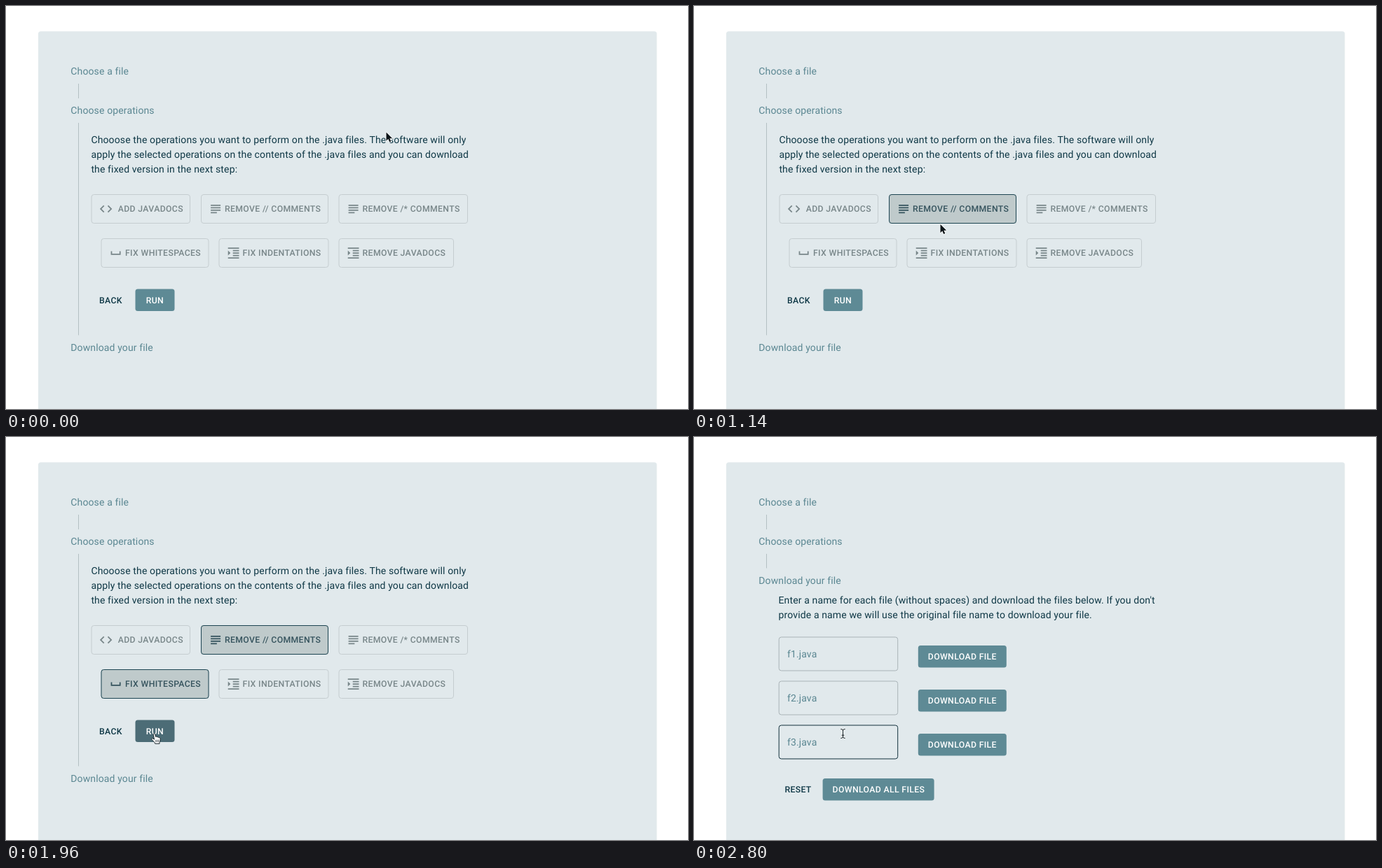
Write an HTML page with a canvas that moves like this. It is 973 px wide and 576 px high and loops after 2.86 s.

```html
<!DOCTYPE html>
<html lang="en">
<head>
<meta charset="utf-8">
<title>Choose operations</title>
<style>
html, body { margin: 0; width: 100%; height: 100%; overflow: hidden; background: #fff; }
canvas { display: block; width: 973px; height: 576px; }
</style>
</head>
<body>
<canvas id="stage"></canvas>
<script>
const W = 973, H = 576, LOOP = 2860;
const canvas = document.getElementById('stage');
const ctx = canvas.getContext('2d');
const dpr = window.devicePixelRatio || 1;
canvas.width = W * dpr;
canvas.height = H * dpr;

const PANEL = '#e1e9ec', INK = '#0f3846', TEAL = '#5b8792', FILL = '#5e8a95', FILL_HOVER = '#4c6c76';
const GRAY = '#788689', EDGE = '#c5cdd0', LINE = '#b3bfc3';
const BODY = '400 14px Roboto, sans-serif', CAPS = '500 12.25px Roboto, sans-serif';

const ICONS = {
  code: 'M9.4 16.6L4.8 12l4.6-4.6L8 6l-6 6 6 6zM14.6 16.6l4.6-4.6-4.6-4.6L16 6l6 6-6 6z',
  lines: 'M14 17H4v2h10zM20 9H4v2h16zM4 15h16v-2H4zM4 5v2h16V5z',
  space: 'M18 9v4H6V9H4v6h16V9z',
  indent: 'M3 21h18v-2H3zM3 8v8l4-4zM11 17h10v-2H11zM3 3v2h18V3zM11 9h10V7H11zM11 13h10v-2H11z'
};
for (const k in ICONS) ICONS[k] = new Path2D(ICONS[k]);

const toggles = [
  { x: 121.5, w: 141.5, y: 269, tx: 159.7, icon: 'code', text: 'ADD JAVADOCS' },
  { x: 278, w: 182, y: 269, tx: 312, icon: 'lines', text: 'REMOVE // COMMENTS', hover: 300, press: 780, select: 960 },
  { x: 474.5, w: 184.5, y: 269, tx: 508.4, icon: 'lines', text: 'REMOVE /* COMMENTS' },
  { x: 135.5, w: 154, y: 332, tx: 170, icon: 'space', text: 'FIX WHITESPACES', hover: 1270, press: 1380, select: 1450 },
  { x: 303.5, w: 157, y: 332, tx: 337.6, icon: 'indent', text: 'FIX INDENTATIONS' },
  { x: 474.5, w: 164.5, y: 332, tx: 508.6, icon: 'indent', text: 'REMOVE JAVADOCS' }
];

// Cursor stops: time, x, y
const track = [
  [0, 543, 181], [20, 543, 181], [400, 398.5, 295.5], [1020, 398.5, 295.5],
  [1360, 238, 354], [1600, 238, 354], [1880, 211.5, 424], [LOOP, 211.5, 424]
];
const SWAP = 2230, SLIDE = 2260, SLIDE_END = 2560;

const ramp = (t, a, b) => Math.min(1, Math.max(0, (t - a) / (b - a)));
const ease = k => k * k * (3 - 2 * k);
const rgb = c => [1, 3, 5].map(i => parseInt(c.slice(i, i + 2), 16));
function mix(a, b, k) {
  const p = rgb(a), q = rgb(b);
  return '#' + p.map((v, i) => Math.round(v + (q[i] - v) * k).toString(16).padStart(2, '0')).join('');
}

function cursorAt(t) {
  let i = 1;
  while (i < track.length - 1 && t > track[i][0]) i++;
  const a = track[i - 1], b = track[i], k = ease(ramp(t, a[0], b[0]));
  return { x: a[1] + (b[1] - a[1]) * k, y: a[2] + (b[2] - a[2]) * k };
}

function label(s, x, y, color, font = BODY) {
  ctx.font = font;
  ctx.letterSpacing = font === BODY ? '0.131px' : '0.35px';
  ctx.textRendering = 'geometricPrecision';
  ctx.fillStyle = color;
  ctx.fillText(s, x, y);
}

function box(x, y, w, h, fill, stroke) {
  const d = stroke ? 0.5 : 0;
  ctx.beginPath();
  ctx.roundRect(x + d, y + d, w - 2 * d, h - 2 * d, 3.5);
  if (fill) { ctx.fillStyle = fill; ctx.fill(); }
  if (stroke) { ctx.strokeStyle = stroke; ctx.lineWidth = 1; ctx.stroke(); }
}

function ripple(x, y, r, color, alpha = 1) {
  ctx.save();
  ctx.clip();
  ctx.globalAlpha = alpha;
  ctx.fillStyle = color;
  ctx.beginPath();
  ctx.arc(x, y, r, 0, 7);
  ctx.fill();
  ctx.restore();
}

function rail(top, bottom) {
  ctx.fillStyle = LINE;
  ctx.fillRect(103, top, 1, bottom - top);
}

function filled(s, x, y, w) {
  box(x, y, w, 31.5, FILL);
  label(s, x + 14, y + 20.2, '#ffffff', CAPS);
}

function drawToggle(b, t) {
  let fill = PANEL, edge = EDGE, ink = GRAY;
  if (b.hover) {
    const over = ramp(t, b.hover, b.hover + 90), on = ramp(t, b.select, b.select + 50);
    fill = mix(mix(PANEL, '#d0dadf', over), '#bfcacb', on);
    edge = mix(mix(EDGE, '#5b8792', over), '#1d4552', on);
    ink = mix(mix(GRAY, TEAL, over), '#35535d', on);
  }
  box(b.x, b.y, b.w, 42, fill);
  if (b.press && t > b.press) {
    const c = cursorAt(b.press), fade = 1 - ramp(t, b.select, b.select + 50);
    if (fade > 0) ripple(c.x, c.y, 150 * ramp(t, b.press, b.press + 90), '#b5c1c5', fade);
  }
  box(b.x, b.y, b.w, 42, null, edge);
  ctx.save();
  ctx.translate(b.x + 10.6, b.y + 10.5);
  ctx.scale(0.875, 0.875);
  ctx.fillStyle = ink;
  ctx.fill(ICONS[b.icon]);
  ctx.restore();
  label(b.text, b.tx, b.y + 25.4, ink, CAPS);
}

function drawOperations(t) {
  label('Chooose the operations you want to perform on the .java files. The software will only', 121.4, 196, INK);
  label('apply the selected operations on the contents of the .java files and you can download', 121.4, 217, INK);
  label('the fixed version in the next step:', 121.4, 238, INK);
  toggles.forEach(b => drawToggle(b, t));

  const swapped = t >= SWAP;
  const dark = ramp(t, 1800, 1880) * (1 - ramp(t, 2270, 2400));
  label(swapped ? 'RESET' : 'BACK', swapped ? 130.3 : 133, 424.5, INK, CAPS);
  box(184.5, 404.5, swapped ? 159 : 56, 31.5, mix(FILL, FILL_HOVER, dark));
  const glow = 1 - ramp(t, 2250, 2400);
  if (t > 2120 && glow > 0) ripple(211.5, 422, 34 * ramp(t, 2120, 2210), '#5f8d97', glow);
  label(swapped ? 'DOWNLOAD ALL FILES' : 'RUN', swapped ? 198.5 : 199.7, 424.5, '#ffffff', CAPS);
}

function drawDownloads(t) {
  label('Enter a name for each file (without spaces) and download the files below. If you don\'t', 120.5, 238, INK);
  label('provide a name we will use the original file name to download your file.', 120.5, 259, INK);
  for (let i = 0; i < 3; i++) {
    const y = 285.5 + 63 * i;
    const over = i === 2 && t >= SLIDE_END - 40;
    box(120.7, y, 170.5, 49, null, over ? '#12313c' : '#a9b3b7');
    label(`f${i + 1}.java`, 132.9, y + 29.8, TEAL);
    filled('DOWNLOAD FILE', 319.8, y + 12.5, 126);
  }
  label('RESET', 129.4, 508.4, INK, CAPS);
  filled('DOWNLOAD ALL FILES', 183.6, 488, 159);
}

function clipped(y, h, draw) {
  if (h <= 0) return;
  ctx.save();
  ctx.beginPath();
  ctx.rect(46, y, 882, h);
  ctx.clip();
  draw();
  ctx.restore();
}

const ARROW = new Path2D('M0 0V12.2L2.8 9.6L4.7 14L6.8 13.1L4.9 8.8H8.7Z');
const HAND = new Path2D('M-1.3 .8C-1.3 -.5 .9 -.5 1.2 .8L2 4.5C2.6 3.7 4 4 4.2 5C5 4.4 6.2 4.8 6.4 5.7C7.4 5.2 8.6 5.9 8.6 7.2C8.8 9.6 8 11 7.5 12.2V14.3H1.2C.6 12 -1.6 10.6 -3.4 8.4C-4.4 7 -2.8 6.1 -1.6 7L-.3 8Z');
const FOLDS = new Path2D('M2.2 9.2V11.8M4.1 9.1V11.8M6 9V11.7');
const BEAM = new Path2D('M-2.8 -6.5Q0 -6.5 0 -4.8Q0 -6.5 2.8 -6.5M0 -5V5M-2.8 6.5Q0 6.5 0 4.8Q0 6.5 2.8 6.5M-1.5 2.2H1.5');

function strokePath(path, color, width) {
  ctx.strokeStyle = color;
  ctx.lineWidth = width;
  ctx.stroke(path);
}

function drawCursor(t) {
  const c = cursorAt(t);
  const inside = (x, y, w, h) => c.x > x && c.x < x + w && c.y > y && c.y < y + h;
  const overButton = toggles.some(b => inside(b.x, b.y, b.w, 42)) || inside(184.5, 404.5, 56, 31.5);
  ctx.save();
  ctx.lineJoin = ctx.lineCap = 'round';
  if (t >= SWAP) {
    ctx.translate(212.5, 424);
    strokePath(BEAM, 'rgba(255,255,255,.75)', 2.2);
    strokePath(BEAM, '#101c21', 1);
  } else if (overButton) {
    ctx.translate(c.x, c.y);
    ctx.fillStyle = '#ffffff';
    ctx.fill(HAND);
    strokePath(HAND, '#17252b', 1);
    strokePath(FOLDS, '#17252b', 0.7);
  } else {
    ctx.translate(c.x - 0.5, c.y - 0.5);
    strokePath(ARROW, '#ffffff', 1.6);
    ctx.fillStyle = '#0b1418';
    ctx.fill(ARROW);
  }
  ctx.restore();
}

function draw(t) {
  ctx.setTransform(dpr, 0, 0, dpr, 0, 0);
  ctx.fillStyle = '#ffffff';
  ctx.fillRect(0, 0, W, H);
  box(46, 36.3, 882.5, H, PANEL);

  const k = ease(ramp(t, SLIDE, SLIDE_END));
  const shift = 283 * (1 - k);
  label('Choose a file', 92.3, 98, TEAL);
  rail(111, 132);
  label('Choose operations', 92.3, 154, TEAL);
  rail(167, 187.5 + shift);
  clipped(167, shift, () => drawOperations(t));
  label('Download your file', 92.2, 210 + shift, TEAL);
  clipped(216 + shift, 320 * k, () => {
    ctx.translate(0, shift);
    drawDownloads(t);
  });
  drawCursor(t);
}

const start = performance.now();
function tick() {
  draw((performance.now() - start) % LOOP);
  requestAnimationFrame(tick);
}
tick();
</script>
</body>
</html>
```
